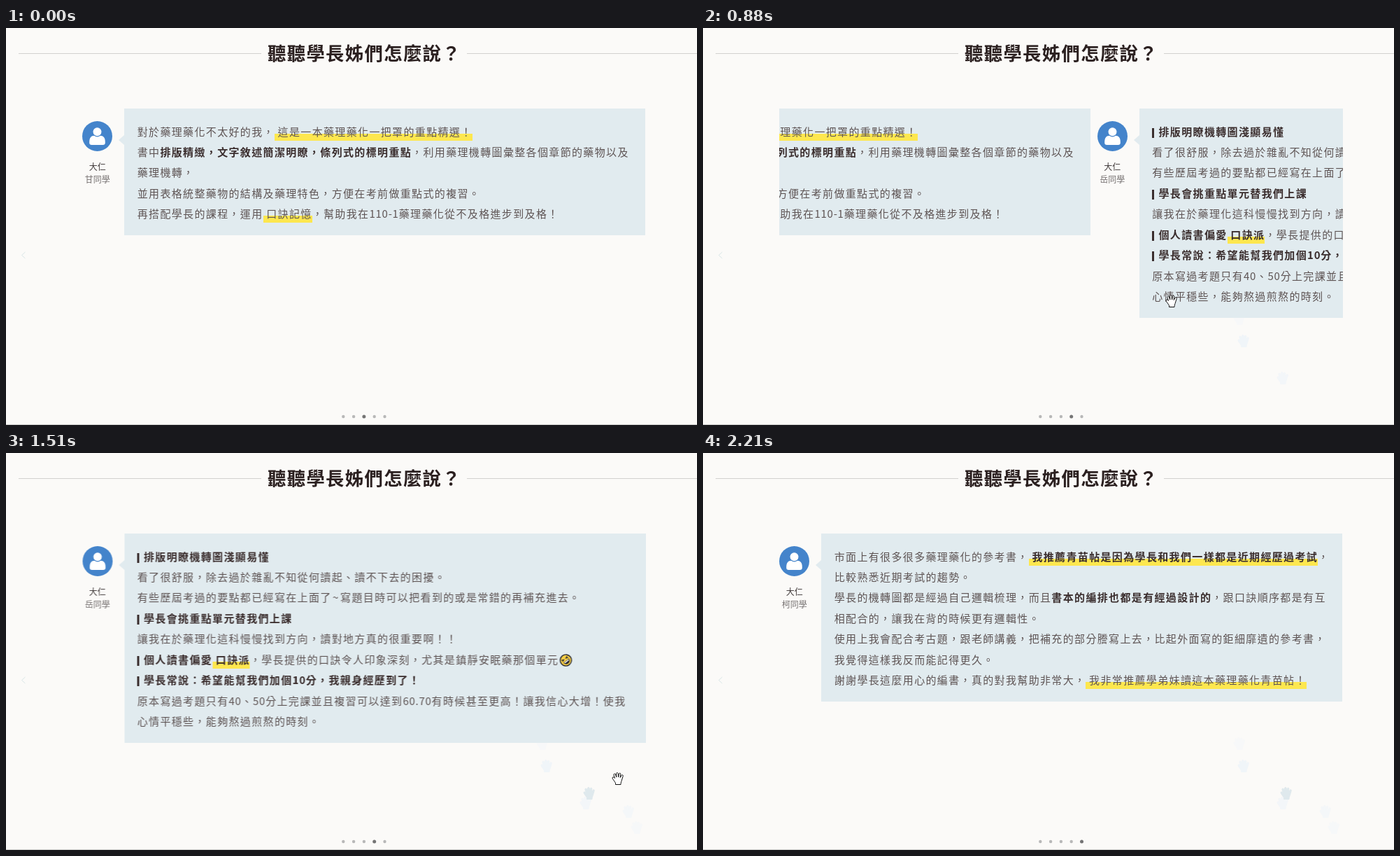
An HTML page that plays this animation: 988 px wide and 567 px high, repeating every 2410 ms.

```html
<!DOCTYPE html>
<html lang="zh-Hant-TW">
<head>
<meta charset="utf-8">
<title>聽聽學長姊們怎麼說？</title>
<style>
html, body { margin: 0; width: 100%; height: 100%; overflow: hidden; background: #fbfaf8; }
body { font: 300 15px/29.45px "Noto Sans CJK TC", "Noto Sans CJK", "Noto Sans CJK JP", sans-serif; color: #5e5454; }
#stage { position: relative; width: 988px; height: 567px; overflow: hidden; }
#stage > * { position: absolute; }
h1 { margin: 0; left: 374px; top: 14px; font-size: 26.3px; line-height: 42px; letter-spacing: 1.4px;
  font-weight: 700; color: #2b2020; white-space: pre; }
.rule { height: 1px; background: #d2d1cf; }
#view { left: 109px; top: 115px; width: 805.5px; height: 310px; overflow: hidden; }
#track { position: absolute; left: 0; top: 0; will-change: transform; }
.slide { position: absolute; top: 0; width: 805.5px; }
.avatar { position: absolute; left: 0; top: 18px; width: 43px; height: 43px; }
.who { position: absolute; left: 0; width: 43.5px; text-align: center; font-size: 12px; line-height: 18px;
  top: 73.5px; font-weight: 400; color: #403a3a; white-space: pre; }
.who span { display: block; margin: 0 -10px; font-weight: 300; color: #777272; }
.card { position: absolute; left: 60.2px; width: 708.3px; padding: 17px 18.5px; background: #e1ebef; }
.card::before { content: ""; position: absolute; left: -8px; top: 38px;
  border: solid transparent; border-width: 7.5px 8px 7.5px 0; border-right-color: #e1ebef; }
p { margin: 0; height: 29.45px; letter-spacing: 1.35px; white-space: pre; position: relative; top: .5px; }
b { font-weight: 700; color: #3a2d2d; }
mark { color: inherit; padding-bottom: 3px; background: linear-gradient(#fde74f, #fde74f) 0 100% / 100% 10px no-repeat; }
i { display: inline-block; width: 3px; height: 14px; margin-right: 6.3px; background: #3a2d2d; vertical-align: -3px; }
.num { letter-spacing: .75px; }
.wave { margin: 0 1.4px; font-weight: 400; }
.laugh { width: 18px; height: 18px; margin-left: 1px; vertical-align: -4px; }
#under, #over { left: 0; top: 0; }
</style>
</head>
<body>
<div id="stage">
  <div class="rule" style="left:18px;top:36px;width:347px"></div>
  <h1>聽聽學長姊們怎麼說？</h1>
  <div class="rule" style="left:659px;top:36px;width:329px"></div>
  <div class="rule" style="left:0;top:566px;width:988px;background:#c9c9c8"></div>

  <svg id="under" width="988" height="567"><g id="trail"></g></svg>

  <div id="view"><div id="track">
    <div class="slide" data-name="甘同學"><div class="card">
      <p>對於藥理藥化不太好的我，<mark> 這是一本藥理藥化一把罩的重點精選！</mark></p>
      <p>書中<b>排版精緻，文字敘述簡潔明瞭，條列式的標明重點</b>，利用藥理機轉圖彙整各個章節的藥物以及</p>
      <p>藥理機轉，</p>
      <p>並用表格統整藥物的結構及藥理特色，方便在考前做重點式的複習。</p>
      <p>再搭配學長的課程，運用<mark> 口訣記憶</mark>，幫助我在<span class="num">110-1</span>藥理藥化從不及格進步到及格！</p>
    </div></div>
    <div class="slide" data-name="岳同學"><div class="card">
      <p><i></i><b>排版明瞭機轉圖淺顯易懂</b></p>
      <p>看了很舒服，除去過於雜亂不知從何讀起、讀不下去的困擾。</p>
      <p>有些歷屆考過的要點都已經寫在上面了<span class="wave">~</span>寫題目時可以把看到的或是常錯的再補充進去。</p>
      <p><i></i><b>學長會挑重點單元替我們上課</b></p>
      <p>讓我在於藥理化這科慢慢找到方向，讀對地方真的很重要啊！！</p>
      <p><i></i><b>個人讀書偏愛<mark> 口訣派</mark></b>，學長提供的口訣令人印象深刻，尤其是鎮靜安眠藥那個單元<svg class="laugh" viewBox="-9 -9 18 18"><g transform="rotate(-38)"><circle r="8.1" fill="#f7cf45" stroke="#2b2b33" stroke-width="1.4"/><path d="M-5 .8H5A5 5 0 0 1-5 .8Z" fill="#2b2b33"/><path d="M-3.8 1.3H3.8V2.6H-3.8Z" fill="#fff"/><path d="M-5-3.8L-2-2.3L-5-1M5-3.8L2-2.3L5-1" fill="none" stroke="#2b2b33" stroke-width="1.2"/></g></svg></p>
      <p><i></i><b>學長常說：希望能幫我們加個<span class="num">10</span>分，我親身經歷到了！</b></p>
      <p>原本寫過考題只有<span class="num">40</span>、<span class="num">50</span>分上完課並且複習可以達到<span class="num">60.70</span>有時候甚至更高！讓我信心大增！使我</p>
      <p>心情平穩些，能夠熬過煎熬的時刻。</p>
    </div></div>
    <div class="slide" data-name="柯同學"><div class="card">
      <p>市面上有很多很多藥理藥化的參考書，<mark><b> 我推薦青苗帖是因為學長和我們一樣都是近期經歷過考試</b></mark>，</p>
      <p>比較熟悉近期考試的趨勢。</p>
      <p>學長的機轉圖都是經過自己邏輯梳理，而且<b>書本的編排也都是有經過設計的</b>，跟口訣順序都是有互</p>
      <p>相配合的，讓我在背的時候更有邏輯性。</p>
      <p>使用上我會配合考古題，跟老師講義，把補充的部分謄寫上去，比起外面寫的鉅細靡遺的參考書，</p>
      <p>我覺得這樣我反而能記得更久。</p>
      <p>謝謝學長這麼用心的編書，真的對我幫助非常大，<mark> 我非常推薦學弟妹讀這本藥理藥化青苗帖！</mark></p>
    </div></div>
  </div></div>

  <svg id="over" width="988" height="567">
    <defs>
      <path id="open" d="M-3.5 8.5V6.3C-5 3.5-8 .5-8-1C-8-2.5-6-2.5-4.5-.5L-6-5C-6.5-7-4.2-7.6-3.6-6L-2.2-2L-2.4-7C-2.4-9 0-9 .2-7L.6-2L1.4-6.6C1.8-8.4 4-8 3.8-6.2L3.2-1.5L5-4.5C6-6 7.8-5 7.2-3.4L5.5 2C5 4 4 5.5 4 8.5Z"/>
      <path id="fist" d="M-3 6.5L-3.2 4.5C-5 2.5-6.4 .5-6-1C-5.6-2.2-4-2-3.5-1L-4.2-3.5C-4.2-5.2-1.8-5.5-1.4-4C-1-6 1-6 1.3-4.2C1.8-5.6 3.6-5.2 3.7-3.6C4.6-4.4 6.3-3.7 6.1-2C6.1 1 4.7 3.5 4.2 6.5Z"/>
    </defs>
    <path d="M27.5 320L22.5 324.5L27.5 329" fill="none" stroke="#d9e5e6"/>
    <g id="dots"></g>
    <g id="cursor" stroke-linejoin="round">
      <use id="hand" href="#open" fill="#fff" stroke="#111" stroke-width="1"/>
      <g id="press">
        <circle r="11.5" fill="#fdee58"/>
        <use href="#fist" fill="#fdee58" stroke="#4a4522" stroke-width="1"/>
      </g>
    </g>
  </svg>
</div>
<script>
const LOOP = 2410, PITCH = 814.5, GLIDE = 530, PULL = 75;
const $ = id => document.getElementById(id);

// Each swipe: button down, full pull, release.
const swipes = [{ down: 680, pull: 750, up: 753 }, { down: 1580, pull: 1650, up: 1663.4 }];

// time, x, y
const path = [
  [130, 829, 500], [270, 773, 447], [340, 767, 415], [410, 766, 388], [480, 765, 385],
  [680, 740, 391], [750, 669, 390], [880, 670, 390], [1160, 808, 470], [1230, 834, 486],
  [1300, 890, 512], [1370, 902, 535], [1510, 875, 465], [1580, 871, 466], [1650, 800, 474], [1720, 800, 479]
];
const HIDE = 1790;

// Faint marks left behind the pointer: x, y, first time, colour
const marks = [
  [829, 500, 200, '#f3f6f9'], [773, 447, 340, '#f0f5f9'], [767, 415, 410, '#f7f8f9'],
  [834, 486, 1300, '#dfe9ed'], [890, 512, 1370, '#f4f7f9'], [902, 535, 1440, '#f6f8f9']
];

document.querySelectorAll('.slide').forEach((el, n) => {
  el.style.left = n * PITCH + 'px';
  el.insertAdjacentHTML('afterbegin', `
    <svg class="avatar" viewBox="-21.5 -21.5 43 43"><circle r="21.5" fill="#4484cb"/>
      <path d="M-11.3 8C-11.3 2.5-8.5-.8-4.5-.8H4.5C8.5-.8 11.3 2.5 11.3 8V9.5Q11.3 12.5 8 12.5H-8Q-11.3 12.5-11.3 9.5Z" fill="#fff"/>
      <circle cy="-6.3" r="6.6" fill="#fff" stroke="#4484cb" stroke-width="1.2"/></svg>
    <div class="who">大仁<span>${el.dataset.name}</span></div>`);
});
$('dots').innerHTML = [0, 1, 2, 3, 4].map(n => `<circle cx="${482.3 + n * 14.8}" cy="555"/>`).join('');
$('trail').innerHTML = marks.map(([x, y, , c]) =>
  `<use href="#open" transform="translate(${x} ${y})" fill="${c}" stroke="${c}"/>`).join('');

// The picture advances in ticks of 70 ms with a few longer holds.
function tick(t) {
  const hold = (from, max) => from + 70 * Math.min(max, Math.floor((t - from) / 70));
  return t < 130 ? 0 : t < 680 ? hold(130, 5) : t < 810 ? hold(680, 1) : hold(810, 20);
}

// cubic-bezier(.25, .1, .25, 1)
function ease(x) {
  if (x >= 1) return 1;
  let lo = 0, hi = 1, s = .5;
  for (let n = 0; n < 24; n++) {
    s = (lo + hi) / 2;
    if (.75 * s - .75 * s * s + s ** 3 < x) lo = s; else hi = s;
  }
  return .3 * s * (1 - s) ** 2 + 3 * s * s * (1 - s) + s ** 3;
}

function shift(t, { down, pull, up }) {
  if (t < down) return 0;
  if (t < pull) return 4;
  if (t < up) return PULL;
  return PULL + (PITCH - PULL) * ease((t - up) / GLIDE);
}

function pointer(t) {
  const n = path.findIndex(k => k[0] > t);
  if (n < 0) return path[path.length - 1].slice(1);
  const [a, b] = [path[Math.max(0, n - 1)], path[n]];
  const f = a === b ? 0 : (t - a[0]) / (b[0] - a[0]);
  return [1, 2].map(c => a[c] + (b[c] - a[c]) * f);
}

const show = (el, on) => el.style.display = on ? '' : 'none';

function draw(t) {
  const x = swipes.reduce((sum, s) => sum + shift(t, s), 0);
  $('track').style.transform = `translateX(${-x}px)`;

  const active = 2 + swipes.filter(s => t >= s.up).length;
  [...$('dots').children].forEach((dot, n) => {
    dot.setAttribute('r', n === active ? 2.5 : 2.2);
    dot.setAttribute('fill', n === active ? '#747474' : '#b8b8b8');
  });

  [...$('trail').children].forEach((el, n) => show(el, t >= marks[n][2]));

  const pressed = swipes.some(s => t >= s.down && t < s.up);
  show($('cursor'), t >= 130 && t < HIDE);
  show($('hand'), !pressed);
  show($('press'), pressed);
  $('cursor').setAttribute('transform', `translate(${pointer(t).join(' ')})`);
}

const start = performance.now();
function frame() {
  draw(tick((performance.now() - start) % LOOP));
  requestAnimationFrame(frame);
}
frame();
</script>
</body>
</html>
```
